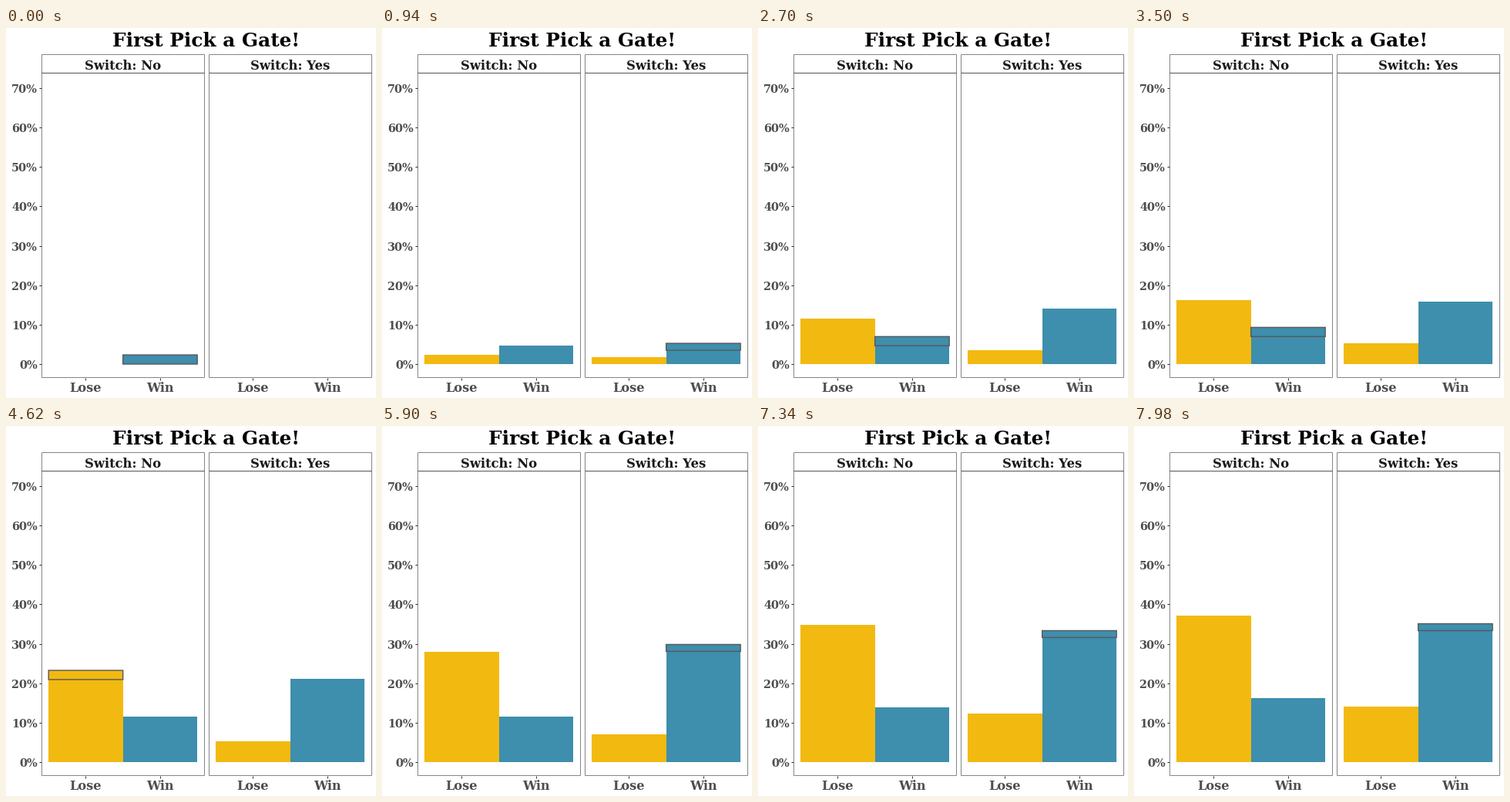
Write a matplotlib script that moves like this. It is 480 px wide and 480 px high and loops after 8 s.

```python
import matplotlib.pyplot as plt
from matplotlib.animation import FuncAnimation
from matplotlib.patches import Rectangle

SIZE, DPI = 480, 100
PX = 72 / DPI                      # points per pixel
LOOP, TICK, STEP, LEAD = 8000, 20, 160, 20

YELLOW, BLUE = "#F2B910", "#3E8EAD"
BASE, PER_PCT = 436.0, 5.116       # y of 0 %, pixels per percent
BAR_W = 96.45
PANEL_X = (46, 263)
PANEL_W, STRIP_TOP, PANEL_TOP, PANEL_BOTTOM = 211, 34, 58, 453

# Games in order: a/b = stay and lose/win, c/d = switch and lose/win
GAMES = ("b" "dadcbda" "ddadda" "adcbadac" "bdabdad"
         "aadcddadd" "accad" "cabdcabd")
BAR_X = dict(a=55.25, b=151.7, c=272.2, d=368.65)
COLOR = dict(a=YELLOW, b=BLUE, c=YELLOW, d=BLUE)
UNIT = {k: 100 / n * PER_PCT for k, n in zip("abcd", (43, 43, 57, 57))}

plt.rcParams["font.family"] = "DejaVu Serif"
plt.rcParams["font.weight"] = "bold"

fig = plt.figure(figsize=(SIZE / DPI, SIZE / DPI), dpi=DPI, facecolor="white")
ax = fig.add_axes([0, 0, 1, 1])
ax.set_xlim(0, SIZE)
ax.set_ylim(SIZE, 0)
ax.axis("off")


def label(x, y, text, px, color, ha="center"):
    ax.text(x, y, text, fontsize=px * PX, color=color, ha=ha, va="baseline")


def line(xs, ys, color):
    ax.plot(xs, ys, color=color, lw=PX, solid_capstyle="butt", zorder=3)


def draw_panel(x, title):
    right = x + PANEL_W
    for edge in (x, right):
        line([edge, edge], [STRIP_TOP, PANEL_BOTTOM], "#858585")
    for y, color in ((STRIP_TOP, "#858585"), (PANEL_TOP, "#555555"),
                     (PANEL_BOTTOM, "#858585")):
        line([x, right], [y, y], color)
    label(x + PANEL_W / 2, 53.5, title, 16.4, "#1A1A1A")


label(260, 23.5, "First Pick a Gate!", 24.8, "black")
for x, title in zip(PANEL_X, ("Switch: No", "Switch: Yes")):
    draw_panel(x, title)

for pct in range(0, 80, 10):
    y = BASE - pct * PER_PCT
    line([43, 46], [y, y], "#333333")
    label(41, y + 6, f"{pct}%", 14.5, "#4D4D4D", ha="right")

for key, name in zip("abcd", ("Lose", "Win") * 2):
    mid = BAR_X[key] + BAR_W / 2
    line([mid, mid], [454, 457], "#333333")
    label(mid, 471.5, name, 16.1, "#4D4D4D")

bars = {k: ax.add_patch(Rectangle((BAR_X[k], BASE), BAR_W, 0, fc=COLOR[k], lw=0))
        for k in "abcd"}
newest = ax.add_patch(Rectangle((0, 0), BAR_W, 0, ec="#595959",
                                lw=1.42 * PX, snap=False, zorder=4))


def draw(i):
    played = GAMES[:(i * TICK + LEAD) // STEP + 1]
    for key, bar in bars.items():
        height = played.count(key) * UNIT[key]
        bar.set_y(BASE - height)
        bar.set_height(height)
    last = played[-1]
    newest.set_xy((BAR_X[last], bars[last].get_y()))
    newest.set_height(UNIT[last])
    newest.set_facecolor(COLOR[last])
    return [*bars.values(), newest]


anim = FuncAnimation(fig, draw, frames=LOOP // TICK, interval=TICK,
                     repeat=True, repeat_delay=0, blit=False)
plt.show()
```
